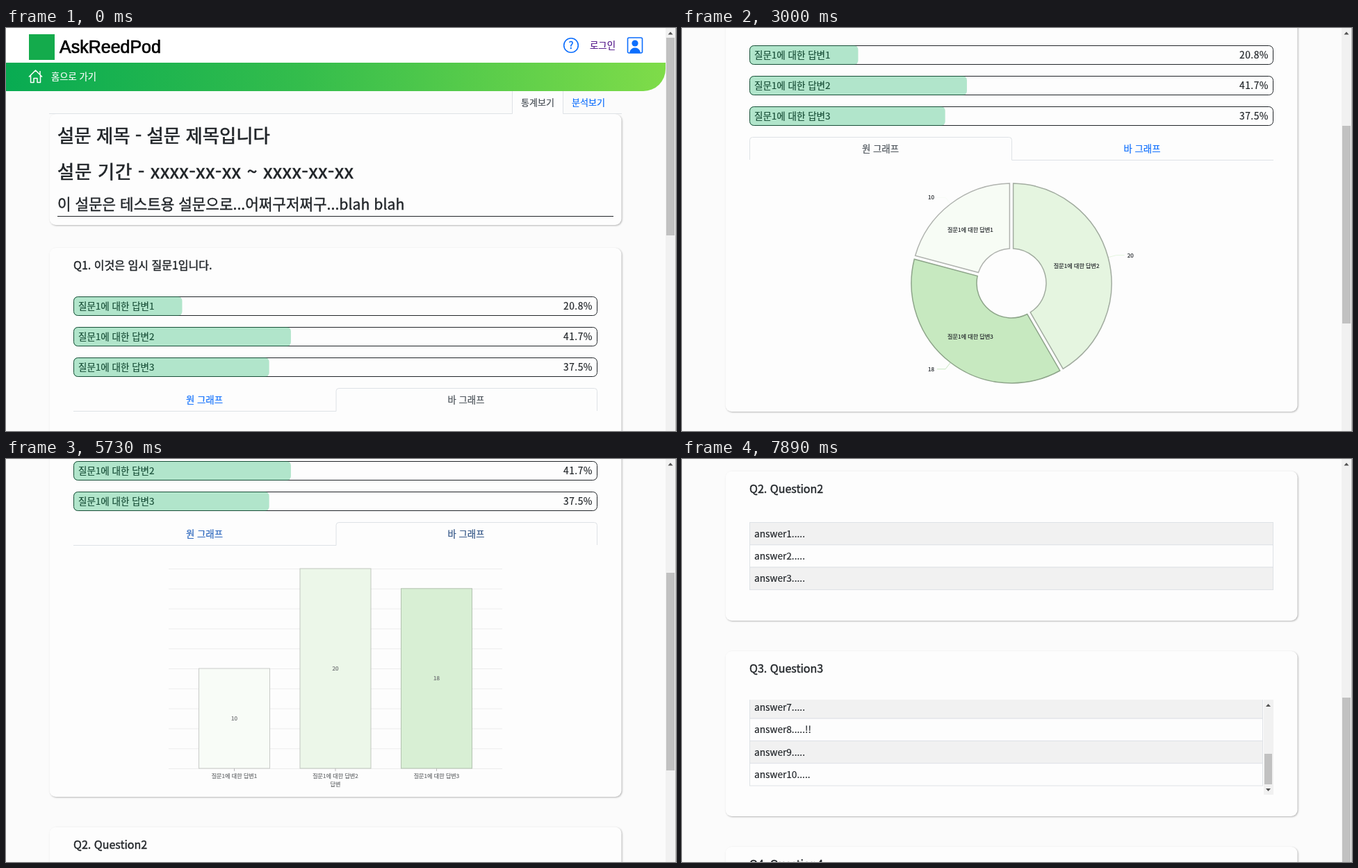
Write an HTML page that moves like this. It is 964 by 581 pixels and loops after 8 s.

```html
<!DOCTYPE html>
<html lang="ko">
<head>
<meta charset="utf-8">
<title>설문 통계</title>
<style>
  html, body { margin: 0; width: 100%; height: 100%; overflow: hidden; }
  body { background: #fbfbfb; font-family: "Noto Sans CJK KR", "Noto Sans CJK", "Noto Sans", sans-serif; }
  #stage { position: relative; width: 964px; height: 581px; overflow: hidden; }
  #page, #bar { position: absolute; left: 0; top: 0; }
  svg { display: block; }
  text { white-space: pre; color: #212529; fill: currentColor; stroke: currentColor; stroke-width: .2px; }
  .medium { stroke-width: .65px; }
  .semi { stroke-width: .4px; }
  .card { fill: #fdfdfd; filter: drop-shadow(1.5px 1.5px 1px #b4b4b4); }
  #tip {
    position: absolute; left: 0; top: 0; height: 28px; padding: 0 6.5px;
    display: flex; align-items: center; white-space: pre; box-sizing: border-box;
    background: #fff; color: #212529; border-radius: 2px; font-size: 13.4px;
    box-shadow: 0 1px 2px rgba(0, 0, 0, .28);
  }
  #chip { width: 9px; height: 9px; margin-right: 4.5px; }
</style>
</head>
<body>
<div id="stage">
  <div id="page">
    <svg id="doc" width="949" height="1700"></svg>
    <div id="tip"><span id="chip"></span><span id="tipName"></span><b id="tipValue"></b></div>
  </div>
  <svg id="bar" width="964" height="581">
    <rect x="949" width="15" height="581" fill="#f1f1f1"/>
    <path d="M952.5 9.500h7l-3.500-4z" fill="#505050"/>
    <rect id="thumb" x="950" width="12" height="285" fill="#c1c1c1"/>
    <path d="M963.500 0V581" stroke="#b5b5b5"/>
  </svg>
</div>
<script>
const LOOP = 8000, STEP = 30, NOTCH = 85.57;
const INK = '#212529', LINE = '#dee2e6';
const BLUE = [13, 110, 253], DEEP = [10, 88, 202], GREY = [73, 80, 87];
const $ = id => document.getElementById(id);
const rgb = c => `rgb(${c.map(Math.round)})`;
const clamp = v => Math.max(0, Math.min(1, v));
const ease = v => { v = clamp(v); return v * v * (3 - 2 * v); };

// keys: rows of [time, ...values], joined by straight lines
function at(keys, t) {
  const i = keys.findIndex(k => k[0] > t);
  if (i === 0) return keys[0].slice(1);
  if (i < 0) return keys[keys.length - 1].slice(1);
  const a = keys[i - 1], b = keys[i], p = (t - a[0]) / (b[0] - a[0]);
  return a.slice(1).map((v, n) => v + (b[n + 1] - v) * p);
}

// ---- drawing helpers; text is placed by its vertical centre
const text = (x, cy, size, str, extra = '') =>
  `<text x="${x}" y="${cy + size * .365}" font-size="${size}" ${extra}>${str}</text>`;
const mid = 'text-anchor="middle"';
const tint = color => `style="color:${color}"`;
const rect = (x, y, w, h, fill, extra = '') =>
  `<rect x="${x}" y="${y}" width="${w}" height="${h}" fill="${fill}" ${extra}/>`;
const path = (d, stroke, extra = '') => `<path d="${d}" fill="none" stroke="${stroke}" ${extra}/>`;
const card = (top, bottom) => rect(62.5, top, 823, bottom - top, '#fdfdfd', 'rx="9" class="card"');
const heading = (cy, str) => text(97, cy, 16.05, str, 'class="semi"');

const slices = [
  { name: '질문1에 대한 답변1', n: 10, fill: '#f7fcf5', edge: '#b0b3af', from: 285, to: 360 },
  { name: '질문1에 대한 답변2', n: 20, fill: '#e5f5e0', edge: '#a2aca0', from: 0, to: 150 },
  { name: '질문1에 대한 답변3', n: 18, fill: '#c7e9c0', edge: '#8ea58a', from: 150, to: 285 }
];

function header() {
  return `<defs><linearGradient id="green"><stop stop-color="#08ab52"/><stop offset=".45" stop-color="#34bd4c"/>
      <stop offset="1" stop-color="#7fdc49"/></linearGradient></defs>` +
    rect(0, 0, 949, 50, '#fff') +
    rect(33, 9, 37, 37, '#14ab4c') +
    `<text x="77" y="35.500" font-size="25" style="color:#000;stroke-width:.7px"
      font-family="Liberation Sans, Arial, sans-serif">AskReedPod</text>` +
    `<circle cx="813" cy="25" r="10.300" fill="none" stroke="${rgb(BLUE)}" stroke-width="1.600"/>` +
    text(813, 25, 15, '?', `${mid} class="semi" ${tint(rgb(BLUE))}`) +
    text(840, 25, 13.4, '로그인', tint('#551a8b')) +
    rect(894.5, 14, 21, 22, '#fff', `rx="2" stroke="${rgb(BLUE)}" stroke-width="1.600"`) +
    `<path d="M897 36c1-6 5-7.500 8-7.500s7 1.500 8 7.500z" fill="${rgb(BLUE)}"/>
     <circle cx="905" cy="22" r="4.600" fill="${rgb(BLUE)}"/>` +
    '<path d="M0 50H949V59A32 32 0 0 1 917 91H0z" fill="url(#green)"/>' +
    path('M33 70.500L42.500 61l9.500 9.500M35.500 68.500V78.500H40V72.500h5V78.500h4.500V68.500M49 67v-5', '#fff',
      'stroke-width="1.500" stroke-linejoin="round"') +
    text(65, 70, 13.3, '홈으로 가기', tint('#fff'));
}

function intro() {
  return card(124, 284) +
    path('M62 123.500H728.500V91M801.500 91V123.500H886', LINE) +
    rect(729, 91, 72, 34, '#fdfdfd') +
    text(765, 107, 13, '통계보기', `${mid} ${tint(rgb(GREY))}`) +
    path('M802.500 123V95q0-4 4-4h63q4 0 4 4V123', '#e2e6ea', 'id="hoverTab"') +
    text(838, 107, 13, '분석보기', `${mid} id="analysis"`) +
    text(74, 155, 26.4, '설문 제목 - 설문 제목입니다', 'class="medium"') +
    text(74, 207.5, 26.4, '설문 기간 - xxxx-xx-xx ~ xxxx-xx-xx', 'class="medium" letter-spacing=".7"') +
    text(74, 254, 21.25, '이 설문은 테스트용 설문으로...어쩌구저쩌구...blah blah', 'class="semi"') +
    path('M74 271.500H874', INK);
}

function answers() {
  return slices.map((s, i) => {
    const y = 387.5 + i * 44, share = s.n / 48;
    return rect(97.5, y, 753, 27, '#fdfdfd', `rx="6" stroke="${INK}"`) +
      text(104, y + 13.5, 13.5, s.name) +
      text(844, y + 13.5, 13.8, (share * 100).toFixed(1) + '%', 'text-anchor="end" letter-spacing=".5"') +
      rect(97, y - .5, 751 * share, 28, 'rgba(0,172,88,.3)', 'rx="6"');
  }).join('');
}

function bars() {
  let out = '';
  for (let i = 0; i <= 10; i++) out += path(`M234 ${586.5 + i * 28.8}H714`, '#e4e4e4');
  slices.forEach((s, i) => {
    const x = 277.5 + i * 145.5, h = s.n * 14.4, cx = x + 51;
    out += rect(x, 874 - h, 102, h, s.fill, `stroke="${s.edge}"`) +
      text(cx, 874 - h / 2, 8.1, s.n, mid) +
      path(`M${cx} 874v4`, '#999') + text(cx, 885, 8.1, s.name, mid);
  });
  return out + text(474, 897, 8.1, '답변', mid);
}

const CX = 474, CY = 730;
const polar = (deg, r) => {
  const a = deg * Math.PI / 180;
  return [CX + r * Math.sin(a), CY - r * Math.cos(a)];
};

// ring sector whose sides run parallel to the cut, half a gap away
function sector(s, R, r = 50, gap = 2.6) {
  const side = q => Math.asin(gap / q) * 180 / Math.PI;
  const big = s.to - s.from > 180 ? 1 : 0;
  return `M${polar(s.from + side(R), R)}A${R} ${R} 0 ${big} 1 ${polar(s.to - side(R), R)}` +
    `L${polar(s.to - side(r), r)}A${r} ${r} 0 ${big} 0 ${polar(s.from + side(r), r)}z`;
}

function pie(grow) {
  return slices.map((s, i) => {
    const R = 144 + 6 * grow[i], a = (s.from + s.to) / 2;
    const [px, py] = polar(a, (R + 50) / 2), elbow = polar(a, R + 12), dir = a < 180 ? 1 : -1;
    return path(`M${polar(a, R)}L${elbow}h${dir * 12}`, s.fill) +
      text(elbow[0] + dir * 16, elbow[1], 8.1, s.n, `text-anchor="${dir > 0 ? 'start' : 'end'}"`) +
      `<path d="${sector(s, R)}" fill="${s.fill}" stroke="${s.edge}" stroke-width="1.500"/>` +
      text(px, py, 8.1, s.name, mid);
  }).join('');
}

const row = (x, y, w, n, tail = '') =>
  rect(x + .5, y, w - 1, 32.3, n % 2 ? '#f1f1f1' : '#fdfdfd', `stroke="${LINE}"`) +
  text(x + 7, y + 16.3, 13.7, `answer${n}.....${tail}`);

function lists() {
  let out = card(958.5, 1174) + heading(984, 'Q2. Question2');
  for (let n = 1; n <= 3; n++) out += row(97, 1032.5 + (n - 1) * 32.3, 754, n);
  out += card(1218, 1456) + heading(1243, 'Q3. Question3') + '<svg x="97" y="1288" width="754" height="137">';
  for (let n = 5; n <= 10; n++) out += row(0, 91.7 + (n - 10) * 32.3, 739, n, n === 8 ? '!!' : '');
  return out + rect(740, 0, 14, 137, '#f1f1f1') + rect(741, 78, 11, 44, '#c1c1c1') +
    '<path d="M743 10h7l-3.500-4zM743 128h7l-3.500 4z" fill="#505050"/></svg>' +
    card(1500, 1690) + heading(1525, 'Q4. Question4');
}

$('doc').innerHTML = header() + intro() + card(317, 915) + heading(342, 'Q1. 이것은 임시 질문1입니다.') +
  answers() + path('', LINE, 'id="tabs"') +
  text(285.5, 536, 13.4, '원 그래프', `${mid} id="tabPie"`) +
  text(662, 536, 13.4, '바 그래프', `${mid} id="tabBar"`) +
  `<g id="bars">${bars()}</g><g id="pie"></g>` + lists();

// ---- timeline
const TO_PIE = 2580, TO_BAR = 5640;
const glide = (a, b, from, to) => [0, .17, .33, .5, .67, .83, 1]
  .map(p => [a + (b - a) * p, (from + (to - from) * ease(p)) * NOTCH]);
const scrollKeys = [
  ...glide(795, 990, 0, 1),
  [1125, NOTCH], [1180, 113], [1250, 195], [1320, 279], [1380, 324], [1440, 4 * NOTCH],
  ...glide(2934, 3150, 4, 5),
  ...glide(7365, 7890, 5, 11)
];
const pieTabKeys = [
  [1710, ...BLUE], [1830, ...DEEP], [2100, ...DEEP], [2190, ...BLUE], [2310, ...BLUE], [2370, ...DEEP],
  [TO_PIE - 30, ...DEEP], [2700, ...GREY], [TO_BAR, ...GREY], [TO_BAR + 150, ...BLUE]
];
const barTabKeys = [
  [0, ...GREY], [TO_PIE - 30, ...GREY], [2700, ...BLUE], [5370, ...BLUE], [5490, ...DEEP],
  [TO_BAR, ...DEEP], [TO_BAR + 150, ...GREY]
];
// hovers: slice, start, end
const pieHover = [[0, 3315, 4065], [2, 4065, 4530], [1, 4530, 5190]];
const barHover = [[2, 5850, 6030], [1, 6030, 6150], [0, 6150, 6330], [1, 6330, 6600],
  [0, 6600, 6870], [1, 6870, 7110], [2, 7110, 7440]];
// tooltip corner, measured with the page at its fifth notch
const tipKeys = [
  [3330, 352, 176], [3600, 330, 190], [3870, 309, 197], [4050, 307, 238], [4260, 306, 275],
  [4500, 400, 378], [4560, 465, 345], [4740, 541, 262], [4920, 494, 241], [5190, 520, 205],
  [5850, 512, 205], [6030, 400, 225], [6180, 190, 240], [6270, 103, 238], [6420, 353, 228],
  [6540, 345, 230], [6720, 245, 290], [6870, 270, 330], [7110, 440, 336], [7290, 591, 320], [7350, 588, 316]
];

function draw(t) {
  const y = Math.round(at(scrollKeys, t)[0]), onPie = t >= TO_PIE && t < TO_BAR;
  $('page').style.transform = `translateY(${-y}px)`;
  $('thumb').setAttribute('y', Math.round(14 + y * .351));

  const tabHover = clamp((t - 180) / 60);
  $('hoverTab').style.opacity = tabHover;
  $('analysis').style.color = rgb(BLUE.map((v, i) => v + (DEEP[i] - v) * tabHover));

  $('tabs').setAttribute('d', onPie
    ? 'M97.500 552V523.500q0-4 4-4H470.500q4 0 4 4V552.500H851'
    : 'M97 552.500H475V523.500q0-4 4-4H846.500q4 0 4 4V552');
  $('tabPie').style.color = rgb(at(pieTabKeys, t));
  $('tabBar').style.color = rgb(at(barTabKeys, t));

  $('bars').style.opacity = onPie ? 0 : t < TO_PIE ? 1 : clamp((t - TO_BAR + 30) / 180);
  $('pie').style.opacity = onPie ? clamp((t - TO_PIE + 30) / 210) : 0;
  if (onPie) {
    const grow = [0, 0, 0];
    for (const [i, a, b] of pieHover) grow[i] = ease((t - a) / 180) - ease((t - b) / 180);
    $('pie').innerHTML = pie(grow);
  }

  const hit = (onPie ? pieHover : barHover).find(h => t >= h[1] && t < h[2]);
  $('tip').style.visibility = hit ? 'visible' : 'hidden';
  if (hit) {
    const s = slices[hit[0]], [tx, ty] = at(tipKeys, t);
    $('tip').style.transform = `translate(${tx}px, ${ty + 5 * NOTCH}px)`;
    $('chip').style.background = s.fill;
    $('tipName').textContent = `${onPie ? '' : 'cnt - '}${s.name}: `;
    $('tipValue').textContent = s.n;
  }
}

const start = performance.now();
function tick() {
  const t = (performance.now() - start) % LOOP;
  draw(Math.floor(t / STEP) * STEP);
  requestAnimationFrame(tick);
}
tick();
</script>
</body>
</html>
```
